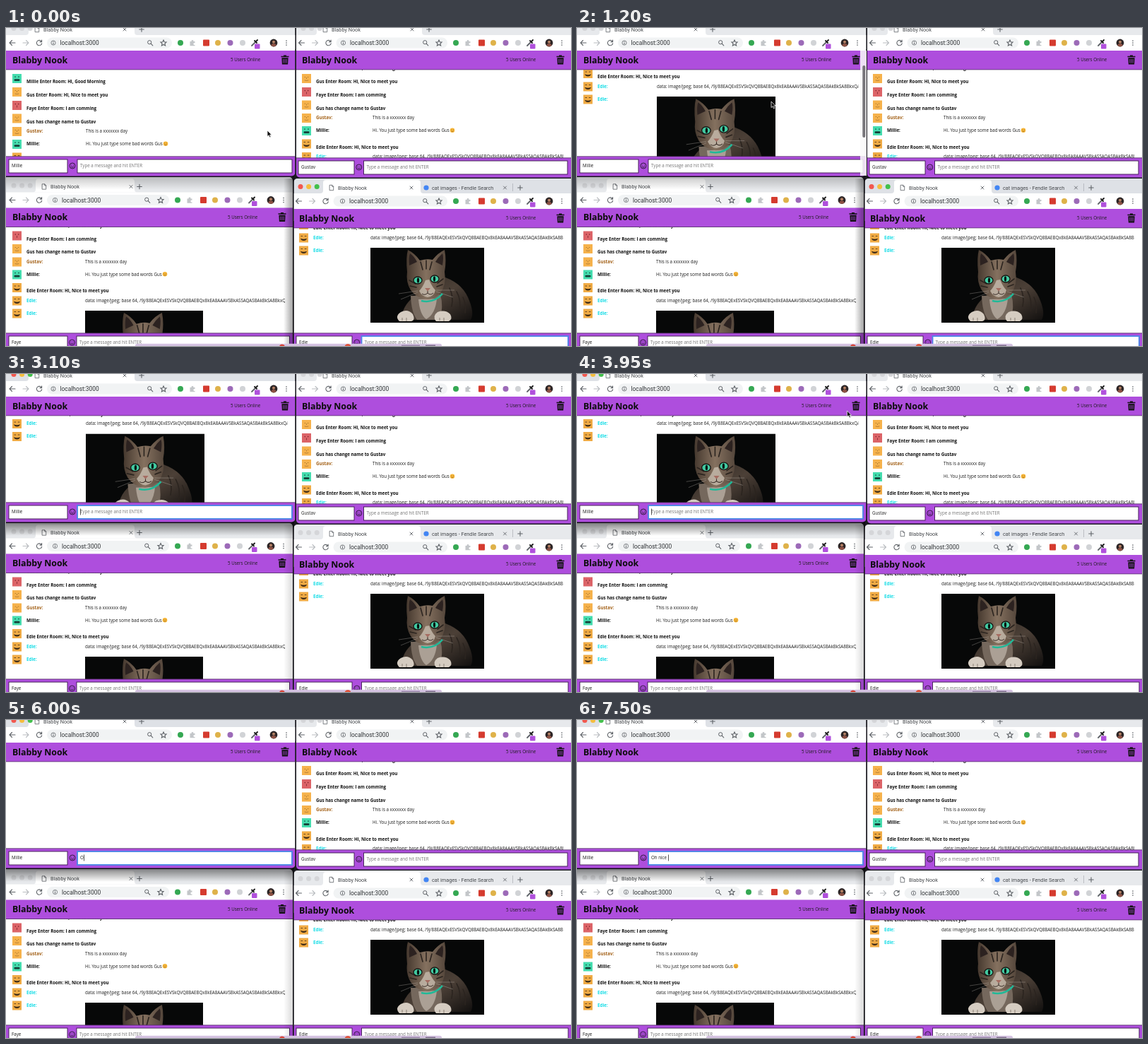
Write an HTML page that moves like this. It is 800x450 px and loops after 7.55 s.

```html
<!DOCTYPE html>
<html lang="en">
<head>
<meta charset="utf-8">
<title>Chat windows</title>
<style>
  html, body { margin: 0; width: 100%; height: 100%; overflow: hidden; background: #1b1a20; }
  #stage { display: block; width: 800px; height: 450px; }
  text { font: 6.2px "Open Sans", sans-serif; fill: #1c1c1c; white-space: pre; }
  .bold { font-weight: 700; fill: #111; }
  .title { font-size: 12.36px; font-weight: 700; fill: #0c0c0c; }
  .tab { font: 7.3px Roboto, sans-serif; fill: #45484c; }
  .url { font: 8.4px Roboto, sans-serif; fill: #303336; }
  .hint { fill: #757575; }
  .line { fill: none; stroke: #5f6368; stroke-width: 1.1; stroke-linecap: round; }
  .pale { stroke: #b9bcc0; }
</style>
</head>
<body>
<svg id="stage" viewBox="0 0 800 450"></svg>
<script>
const LOOP = 7550;
const PURPLE = '#ae4edd';
const ROOM = 'Blabby Nook';

// Seeded filler letters for the long line of gibberish in the chat.
function gibberish(count, seed) {
  const letters = 'AQEBSAkVx8';
  let s = '';
  while (s.length < count) {
    seed = (seed * 75 + 74) % 65537;
    s += letters[seed % letters.length];
  }
  return s;
}
const IMAGE_TEXT = 'data: image/jpeg; base 64, /9j/' + gibberish(60, 7);

const people = {
  Millie: { skin: '#45dcae', ink: '#111' },
  Gus:    { skin: '#f6b24c', ink: '#111' },
  Gustav: { skin: '#f6b24c', ink: '#a5641c' },
  Faye:   { skin: '#dc6468', ink: '#111' },
  Edie:   { skin: '#f0ab45', ink: '#14dce6' }
};

// Rows sit at dy below the first one; a notice has no second column.
const rows = [
  { dy: 0,     who: 'Millie', note: 'Millie Enter Room: Hi, Good Morning' },
  { dy: 19,    who: 'Gus',    note: 'Gus Enter Room: Hi, Nice to meet you' },
  { dy: 38,    who: 'Faye',   note: 'Faye Enter Room: I am comming' },
  { dy: 56.5,  who: 'Gus',    note: 'Gus has change name to Gustav' },
  { dy: 70,    who: 'Gustav', say: 'This is a xxxxxxx day' },
  { dy: 88,    who: 'Millie', say: 'Hi. You just type some bad words Gus', smile: true },
  { dy: 111.5, who: 'Edie',   note: 'Edie Enter Room: Hi, Nice to meet you' },
  { dy: 125,   who: 'Edie',   say: IMAGE_TEXT },
  { dy: 143,   who: 'Edie',   photo: true }
];

// left/right/top/bottom: frame; edge: right anchor; head/foot: tops of the purple bars
const windows = [
  { id: 'a', left: -8, right: 409.5, top: -30, bottom: 209.5, edge: 410, head: 32, foot: 182, base: 76,
    x: 9, col: 113, clip: 398.5, tab: 44, tabEnd: 178, plus: 192, url: 76.5, user: 'Millie', box: [4, 87, 101, 405], pic: 168 },
  { id: 'b', left: 411, right: 808, top: -30, bottom: 211.5, edge: 800, head: 32, foot: 184, base: 57,
    x: 419, col: 519, clip: 789, tab: 452, tabEnd: 585, plus: 599, url: 487, user: 'Gustav', box: [414, 493, 506.5, 795], pic: 162 },
  { id: 'c', left: -8, right: 406, top: 211, bottom: 460, edge: 406, head: 254.5, foot: 432, base: 260.5,
    x: 9, col: 112, clip: 395, tab: 54, tabEnd: 178, plus: 189, url: 79, user: 'Faye', box: [4, 87, 100, 401.5], pic: 167 },
  { id: 'd', left: 407.5, right: 808, top: 213, bottom: 460, edge: 800, head: 256, foot: 432, base: 171.5,
    x: 415, col: 516, clip: 789, tab: 461, tabEnd: 583, plus: 728, url: 486, user: 'Edie', box: [411, 490, 503.5, 796], pic: 161, extraTab: true }
];

const rect = (x, y, w, h, fill, more = '') =>
  `<rect x="${x}" y="${y}" width="${w}" height="${h}" fill="${fill}" ${more}/>`;
const dot = (x, y, r, fill, more = '') => `<circle cx="${x}" cy="${y}" r="${r}" fill="${fill}" ${more}/>`;
const path = (d, more = 'class="line"') => `<path d="${d}" ${more}/>`;
const text = (x, y, s, cls = '', more = '') => `<text x="${x}" y="${y}" class="${cls}" ${more}>${s}</text>`;
const at = (x, y, inner) => `<g transform="translate(${x} ${y})">${inner}</g>`;

function avatar(x, y, who) {
  const ink = 'fill="none" stroke="#6b4420" stroke-width=".7"';
  const faces = {
    Millie: rect(3, 3.5, 2, 1.2, '#17664f') + rect(8, 3.5, 2, 1.2, '#17664f') + rect(2.5, 7.3, 8, 2.6, '#143f38', 'rx="1.2"'),
    Faye: dot(4.3, 4.6, .8, '#7d2730') + dot(8.7, 4.6, .8, '#7d2730') + path('M6.5 6.5v3', 'fill="none" stroke="#7d2730" stroke-width=".8"'),
    Edie: rect(2.5, 3.6, 2.6, .9, '#573a18') + rect(7.8, 3.6, 2.6, .9, '#573a18') +
      path('M2 7.2q4.5 2 9 0q-1 3.2-4.5 3.2t-4.5-3.2', 'fill="#3c2a17"'),
    Gus: dot(4.3, 4.5, .6, '#8f6220') + dot(8.7, 4.5, .6, '#8f6220') + path('M6.5 5v2M3.7 9q2.8 1 5.6 0', ink + ' opacity=".65"')
  };
  return at(x, y, rect(0, 0, 13, 13, people[who].skin) + (faces[who] || faces.Gus));
}

function chat(w) {
  return rows.map(r => {
    const cy = w.base + r.dy, y = cy + 2.2;
    let s = avatar(w.x, cy - (r.note ? 11 : 6), r.who);
    s += r.note ? text(w.x + 20, y, r.note, 'bold')
                : text(w.x + 20, y, r.who + ':', 'bold', `style="fill:${people[r.who].ink}"`);
    if (r.say) s += text(w.col, y, r.say);
    if (r.smile) s += at(w.col + 113, cy - .2, dot(0, 0, 3.3, '#f8b83a') +
      path('M-1.8 -.9h1M.8 -.9h1M-1.7 1q1.7 1.6 3.4 0', 'fill="none" stroke="#80501a" stroke-width=".6"'));
    if (r.photo) s += `<use href="#cat" x="${w.col}" y="${cy - 3.5}" width="${w.pic}" height="${w.pic * 106 / 161}"/>`;
    return s;
  }).join('');
}

function toolbar(w) {
  const y = w.head - 11, o = w.left < 0 ? 0 : w.x - 9.5, e = w.edge - 410;
  return rect(w.left, w.head - 22, w.right - w.left, 22, '#fff') +
    rect(o + 58, y - 7.5, 177 + e - o, 15, '#f1f3f4', 'rx="7.5"') +
    at(o + 9, y, path('M4 0h-8m3.5 -3.5l-3.5 3.5l3.5 3.5')) +
    at(o + 28, y, path('M-4 0h8m-3.5 -3.5l3.5 3.5l-3.5 3.5', 'class="line pale"')) +
    at(o + 47, y, path('M3 -2.2a3.7 3.7 0 1 0 .7 3M3.6 -4v2.6h-2.6')) +
    at(w.url - 9.5, y, dot(0, 0, 3.1, 'none', 'stroke="#5f6368" stroke-width=".8"') + path('M0 -1.6v.1M0 0v1.5')) +
    text(w.url, y + 3, 'localhost:3000', 'url') +
    at(e + 204, y, dot(-.8, -.8, 2.6, 'none', 'stroke="#5f6368"') + path('M1.2 1.2l2.6 2.6')) +
    at(e + 223, y, path('M0 -4l1.2 2.7l2.9 .3l-2.2 2l.7 2.9l-2.6 -1.5l-2.6 1.5l.7 -2.9l-2.2 -2l2.9 -.3z')) +
    dot(e + 247, y, 4, '#35a853') +
    at(e + 264, y, path('M-3.5 -2h2.2a1.4 1.4 0 1 1 2.6 0h2.2v2.3a1.4 1.4 0 1 0 0 2.4v1.5h-7z', 'fill="#c3c6c9"')) +
    rect(e + 279, y - 4.5, 9, 9, '#d53b2f', 'rx="1"') +
    dot(e + 300, y, 4, '#dfb24a') +
    dot(e + 317.5, y, 4, '#9c6ab8') +
    dot(e + 335, y, 4, '#d1d3d6') +
    at(e + 352, y, path('M-4 4l5 -5', 'class="line" style="stroke-width:1.8"') +
      path('M0 -3l3 3M2 -2l2 -2', 'class="line" style="stroke:#222;stroke-width:2"')) +
    rect(e + 352, y + 1.5, 7.5, 7, '#b050dc', 'rx="1"') +
    at(e + 379, y, dot(0, 0, 5.4, '#2c2526') + dot(0, -1.2, 2, '#b48064') + path('M-3.6 4q0 -3 3.6 -3t3.6 3q-3.6 2.8-7.2 0', 'fill="#8d5144"')) +
    [-3, 0, 3].map(d => dot(e + 397, y + d, .85, '#5f6368')).join('');
}

function tabs(w) {
  const y = w.head - 30, b = w.head - 22, l = w.tab - 12, r = w.tabEnd, t = b - 19;
  const cross = x => at(x, y, path('M-2 -2l4 4m0 -4l-4 4', 'class="line" style="stroke-width:.9"'));
  const lightX = w.left < 0 ? 11 : w.x + 2;
  let s = rect(w.left, w.top, w.right - w.left, 60, '#e7e9ec', `id="strip-${w.id}"`) +
    path(`M${l - 4} ${b}q4 0 4 -4v${-11}q0 -4 4 -4H${r}q4 0 4 4V${b - 4}q0 4 4 4z`, 'fill="#fff"') +
    at(w.tab, y, path('M-2.5 -3.7h3.2l2 2v5.4h-5.2zM.7 -3.7v2h2', 'class="line" style="stroke-width:.8"')) +
    text(w.tab + 9, y + 2.6, ROOM, 'tab') + cross(r - 10 + (w.id === 'c' ? 9 : w.id === 'd' ? 1 : 0)) +
    at(w.plus, y, path('M-3.3 0h6.6M0 -3.3v6.6'));
  if (w.extraTab) s += dot(595, y, 3.6, '#4285f4') + text(603, y + 2.6, 'cat images - Fendle Search', 'tab') +
    cross(706.5) + rect(717, t + 5, .7, 11, '#a9adb2');
  for (let i = 0; i < 3; i++) s += dot(lightX + i * 11.6, w.head - 31.5, 3.5, '#d5d6d9', `class="light-${w.id}"`);
  return s;
}

function bars(w) {
  const span = w.right - w.left, h = w.head, f = w.foot, [n0, n1, m0, m1] = w.box;
  const field = (x0, x1, id = '') => rect(x0, f + 4, x1 - x0, 19, '#fff', `stroke="#3a1a4c" stroke-width=".9" ${id}`);
  return rect(w.left, h, span, 27, PURPLE) + rect(w.left, h + 26.5, span, .8, '#59306e') +
    text(w.x, h + 17.5, ROOM, 'title') + text(w.edge - 92, h + 15.2, '5 Users Online') +
    at(w.edge - 15, h + 13, path('M-5.5 -5.2h11v1.5h-11zM-2 -6.6h4v1.5h-4zM-4.6 -2.8h9.2l-.5 9.2h-8.2z', 'fill="#111"') +
      path('M-2.2 -1v5.6M0 -1v5.6M2.2 -1v5.6', 'stroke="#ae4edd" stroke-width=".8"')) +
    rect(w.left, f, span, 30, PURPLE) + rect(w.left, f - .6, span, .9, '#59306e') +
    field(n0, n1) + text(n0 + 4, f + 15.2, w.user) +
    at((n1 + m0) / 2, f + 13, dot(0, 0, 4, 'none', 'stroke="#251330" stroke-width=".9"') + dot(-1.4, -1, .6, '#251330') +
      dot(1.4, -1, .6, '#251330') + path('M-2.1 1q2.1 2.3 4.2 0', 'fill="none" stroke="#251330" stroke-width=".9"')) +
    field(m0, m1, `id="field-${w.id}"`) +
    text(m0 + 4, f + 15.2, 'Type a message and hit ENTER', 'hint', `id="entry-${w.id}"`);
}

function windowView(w) {
  const top = w.head + 27, wide = w.clip - w.left, tall = w.foot - top, span = w.right - w.left;
  return `<clipPath id="clip-${w.id}">${rect(w.left, w.top, span, w.bottom - w.top, '#fff', 'rx="5"')}</clipPath>
    <g clip-path="url(#clip-${w.id})">${tabs(w)}${toolbar(w)}
    ${rect(w.left, top, span, tall, '#fff')}
    <svg x="${w.left}" y="${top}" width="${wide}" height="${tall}" viewBox="${w.left} ${top} ${wide} ${tall}">
    <g id="chat-${w.id}">${chat(w)}</g></svg>${bars(w)}</g>`;
}

const stripes = 'fill="none" stroke="#2b241f" stroke-width="1.6" stroke-linecap="round"';
const defs = `<defs>
  <linearGradient id="fur" x1="0" x2="1"><stop stop-color="#46392f"/><stop offset=".5" stop-color="#85715f"/><stop offset="1" stop-color="#54463b"/></linearGradient>
  <linearGradient id="back" x1="0" y1="0" x2="1" y2="1"><stop stop-color="#2f2822"/><stop offset=".5" stop-color="#4c4037"/><stop offset="1" stop-color="#12100f"/></linearGradient>
  <linearGradient id="down" x2="0" y2="1"><stop stop-opacity=".5"/><stop offset="1" stop-opacity="0"/></linearGradient>
  <linearGradient id="side"><stop stop-opacity="0"/><stop offset="1" stop-opacity=".4"/></linearGradient>
  <symbol id="cat" viewBox="0 0 161 106">
    ${rect(0, 0, 161, 106, '#070808')}
    ${path('M100 40Q128 48 138 70T142 102H46Q42 88 58 72z', 'fill="url(#back)"')}
    ${path('M57 68Q58 92 66 102H98Q104 84 99 66z', 'fill="#75685d"')}
    ${path('M68 73Q70 95 79 101Q92 94 94 72z', 'fill="#b9aea3" opacity=".8"')}
    ${path('M52 34Q50 14 53 3Q63 8 70 18Q80 15 88 17Q96 7 105 3Q108 18 105 34Q108 52 99 64Q90 73 80 73Q66 72 57 60Q50 48 52 34z', 'fill="url(#fur)"')}
    ${path('M55 25Q54 13 56 8Q62 12 66 20zM102 25Q104 13 102 8Q96 13 92 20z', 'fill="#2c2220"')}
    ${path('M71 20l3 11M79 18v12M87 20l-3 11M55 46l9 5M56 54l9 2M103 44l-8 6M102 52l-8 3M112 57q6 12 3 26M122 62q7 12 4 28M131 70q5 10 3 22', stripes)}
    ${path('M78 46Q74 56 69 61Q73 69 81 70Q90 69 92 60Q87 55 83 45z', 'fill="#c7bcae" opacity=".8"')}
    <g stroke="#161412" stroke-width="1.3"><ellipse cx="67" cy="46" rx="6" ry="5" fill="#42c9a0"/><ellipse cx="91" cy="44" rx="6" ry="5" fill="#42c9a0"/></g>
    <ellipse cx="67.5" cy="46" rx="1.6" ry="3.7" fill="#06110f"/><ellipse cx="90.5" cy="44" rx="1.6" ry="3.7" fill="#06110f"/>
    ${path('M77 57h8l-4 4.5z', 'fill="#a56d62"')}
    ${path('M81 61v3q-4 4-8 1M81 64q4 4 8 0', 'fill="none" stroke="#3c302a" stroke-width="1"')}
    ${path('M67 61l-27 4M67 63l-24 10M93 60l26 0M93 62l24 8', 'stroke="#d8d2cb" stroke-width=".5" opacity=".6"')}
    ${path('M72 75Q90 79 102 65', 'fill="none" stroke="#20b998" stroke-width="2.5"')}
    ${path('M41 104Q34 97 43 91Q53 86 60 94Q64 102 58 104zM93 104Q87 97 95 91Q106 87 113 94Q117 101 111 104z', 'fill="#d5ccc1"')}
    ${path('M45 103v-4M51 104v-5M98 103v-4M104 104v-5', 'stroke="#83776c" stroke-width=".9"')}
  </symbol></defs>`;

const dock = rect(183, 446.8, 434, 8, '#d5c3e2', 'rx="3"') +
  dot(391, 451.5, 4, '#d8483b') + dot(484, 451.5, 4.5, '#e0573f') + rect(560, 448.5, 26, 4, '#9d8bad') + rect(594, 448.5, 14, 4, '#82728f');

const [wa, wb, wc, wd] = windows;
const stage = document.getElementById('stage');
stage.innerHTML = defs + rect(0, 0, 800, 450, '#1b1a20') + windowView(wc) +
  rect(393, 213, 14.5, 237, 'url(#side)', 'id="side-shade"') + windowView(wd) +
  rect(0, 209, 408, 20, 'url(#down)', 'id="low-shade"') + windowView(wb) + windowView(wa) +
  `<g id="bar">${rect(401, 32, 9, 177, '#fafafa', 'id="track" opacity=".85"')}${rect(404.3, 53, 4, 102, '#77757a', 'id="thumb" rx="2"')}</g>` +
  rect(105, 190.5, .7, 9, '#111', 'id="caret"') + dock +
  path('M0 0V8.6L2 6.8L3.5 10L5 9.3L3.6 6.2H6.2z', 'id="mouse" fill="#111" stroke="#fff" stroke-width=".7"');

const $ = id => document.getElementById(id);
const lights = id => [...document.querySelectorAll('.light-' + id)];
const ui = { chat: $('chat-a'), entry: $('entry-a'), field: $('field-a'), far: $('field-d'),
  track: $('track'), thumb: $('thumb'), caret: $('caret'), mouse: $('mouse'), low: $('low-shade'), side: $('side-shade') };
const frontLights = lights('a'), backLights = lights('d');

const FOCUS = 2900, CLEAR = 4200, REFOCUS = 5050;
const mousePath = [[0, 370, 145], [250, 370, 145], [700, 275, 104], [1300, 275, 104], [1950, 319, 71], [2200, 319, 71],
  [2800, 180, 192], [3350, 180, 192], [4050, 394, 44], [4300, 394, 44], [4900, 179, 180], [REFOCUS, 176, 192]];
const scrollPath = [[0, 0], [500, 0], [1150, 118.5], [1250, 118.5], [1600, 131]];
const SENTENCE = 'Oh nice ';
const keyTimes = [5900, 6200, 6450, 6650, 6850, 7050, 7200, 7380];

function follow(steps, t) {
  const i = steps.findIndex(s => s[0] > t);
  if (i < 0) return steps[steps.length - 1].slice(1);
  const a = steps[i - 1], b = steps[i], u = (t - a[0]) / (b[0] - a[0]), k = u * u * (3 - 2 * u);
  return a.slice(1).map((v, j) => v + (b[j + 1] - v) * k);
}

function paintActive(group, id, on) {
  const colors = on ? ['#f2584e', '#f5bd3d', '#43c04c'] : ['#d5d6d9', '#d5d6d9', '#d5d6d9'];
  group.forEach((l, i) => l.setAttribute('fill', colors[i]));
  $('strip-' + id).setAttribute('fill', on ? '#dee1e6' : '#e7e9ec');
}

function outline(el, on) {
  el.setAttribute('stroke', on ? '#4f86e6' : '#3a1a4c');
  el.setAttribute('stroke-width', on ? 1.9 : .9);
}

const show = (el, on) => el.setAttribute('visibility', on ? 'visible' : 'hidden');

function draw(t) {
  const active = t >= FOCUS, cleared = t >= CLEAR;
  const focused = (t >= FOCUS && t < CLEAR) || t >= REFOCUS;
  paintActive(frontLights, 'a', active);
  paintActive(backLights, 'd', !active);
  outline(ui.field, focused);
  outline(ui.far, !active);
  ui.low.setAttribute('opacity', active ? 1 : .45);
  ui.side.setAttribute('opacity', active ? .4 : 1);

  ui.chat.setAttribute('transform', `translate(0 ${-follow(scrollPath, t)[0]})`);
  show(ui.chat, !cleared);
  show(ui.thumb, (t > 500 && t < 1800) || (cleared && t < 5300));
  show(ui.track, t > 900 && t < 1800);
  ui.thumb.setAttribute('y', cleared ? 72 : 53);
  ui.thumb.setAttribute('height', cleared ? 136 : 102);

  const typed = SENTENCE.slice(0, keyTimes.filter(k => k <= t).length);
  ui.entry.textContent = typed || 'Type a message and hit ENTER';
  ui.entry.setAttribute('class', typed ? '' : 'hint');
  const start = t < CLEAR ? FOCUS : REFOCUS;
  show(ui.caret, focused && (typed !== '' || (t - start) % 1000 < 500));
  ui.caret.setAttribute('x', 105 + (typed ? ui.entry.getComputedTextLength() + .4 : 0));

  const [x, y] = follow(mousePath, t);
  ui.mouse.setAttribute('transform', `translate(${x} ${y})`);
  show(ui.mouse, t < FOCUS || (t > 3350 && t < REFOCUS));
}

const begin = performance.now();
function tick() {
  draw((performance.now() - begin) % LOOP);
  requestAnimationFrame(tick);
}
draw(0);
requestAnimationFrame(tick);
</script>
</body>
</html>
```
